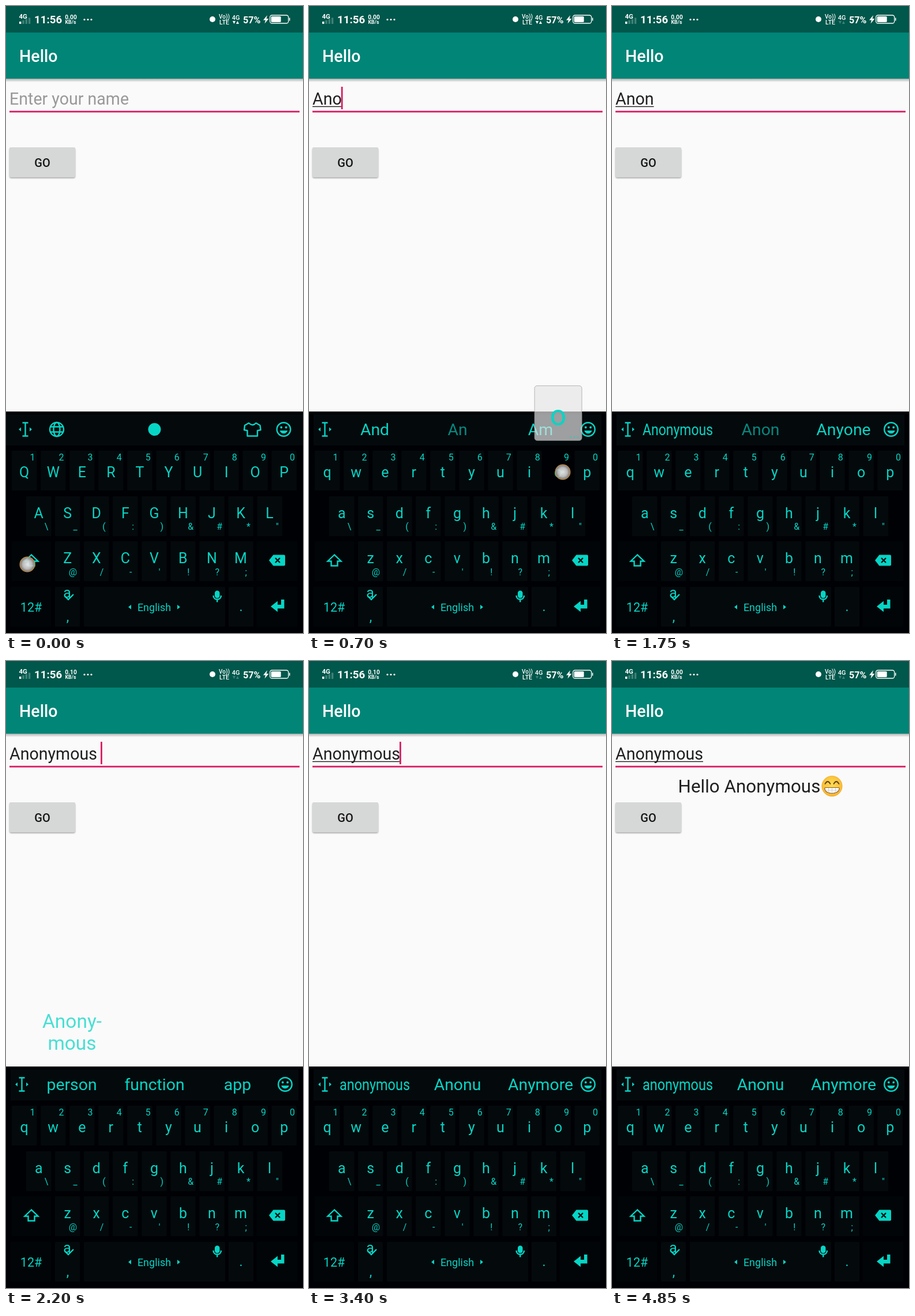
An HTML page for the animation above (4.9 s loop, 515 px wide and 1087 px high).

```html
<!DOCTYPE html>
<html lang="en">
<head>
<meta charset="utf-8">
<title>Hello</title>
<style>
  html, body { margin: 0; width: 100%; height: 100%; overflow: hidden; background: #fafafa; }
  svg { display: block; width: 515px; height: 1087px; }
  text { font-family: Roboto, "Noto Sans", sans-serif; white-space: pre; }
  .ink { fill: #1f1f1f; }
  .key { fill: #04090c; }
  .fn { fill: #020508; }
  .teal { fill: #06d5c5; }
  .line { fill: none; stroke: #06d5c5; stroke-width: 2.4; }
  .mid { text-anchor: middle; }
  .bold { font-weight: 700; fill: #fff; }
</style>
</head>
<body>
<svg id="stage" viewBox="0 0 515 1087"></svg>
<script>
const LOOP = 4900, FIELD = 28.6;
const stage = document.getElementById('stage');
const $ = id => document.getElementById(id);

const rect = (x, y, w, h, attrs = '') => `<rect x="${x}" y="${y}" width="${w}" height="${h}" ${attrs}/>`;
const path = (d, attrs) => `<path d="${d}" ${attrs}/>`;
const escape = s => s.replace(/&/g, '&amp;').replace(/</g, '&lt;');
const text = (s, x, y, size, attrs = 'class="teal mid"') =>
  `<text x="${x}" y="${y}" font-size="${size}" ${attrs}>${escape(s)}</text>`;
const group = (id, body, attrs = '') => `<g id="${id}" ${attrs}>${body}</g>`;

const defs = `<defs>
  <linearGradient id="shade" x2="0" y2="1">
    <stop stop-color="#000" stop-opacity=".3"/><stop offset="1" stop-color="#000" stop-opacity="0"/>
  </linearGradient>
  <radialGradient id="touch">
    <stop stop-color="#eee" stop-opacity=".95"/><stop offset=".6" stop-color="#ccc" stop-opacity=".92"/>
    <stop offset="1" stop-color="#8a8a8a" stop-opacity=".85"/>
  </radialGradient>
  <radialGradient id="face" cy=".4" r=".6">
    <stop stop-color="#ffdd55"/><stop offset="1" stop-color="#f9b52a"/>
  </radialGradient>
  <filter id="soft" x="-10%" y="-10%" width="120%" height="130%"><feGaussianBlur stdDeviation="1.3"/></filter>
</defs>`;

function statusBar() {
  const bars = [0, 1, 2, 3].map(i =>
    rect(23 + i * 5.3, 27 - i * 2.2, 3.4, 4 + i * 2.2, `fill="#fff" opacity="${i ? .25 : 1}"`)).join('');
  const dots = [136, 142, 148].map(x => `<circle cx="${x}" cy="23.5" r="1.6" fill="#fff"/>`).join('');
  const bold = 'class="bold"', midBold = 'class="bold mid"', plain = 'class="mid" fill="#fff" font-weight="500"';
  return rect(0, 0, 515, 46, 'fill="#00574b"') + bars + dots +
    text('4G', 22.5, 22, 11.5, bold) + text('11:56', 49, 30, 18.7, bold) +
    text('0.00', 112.5, 22.5, 10.2, midBold + ' id="rate"') + text('KB/s', 112, 31, 8.8, midBold) +
    '<circle cx="358" cy="23" r="5" fill="#fff"/>' +
    text('Vo))', 378.5, 22, 10, plain) + text('LTE', 378.5, 31.5, 10.5, plain) +
    text('4G', 398.5, 23.5, 11, plain) +
    path('M393 26h5l-2.5 5zM399 31h5l-2.5 -5z', 'id="data" fill="#fff"') +
    text('57%', 411, 29.5, 16.2, bold) +
    path('M453 16l-7 8.5h4l-1.5 6 7-8.5h-4z', 'fill="#fff"') +
    rect(457.7, 16, 32, 14, 'rx="3.5" fill="none" stroke="#fff" stroke-width="1.3"') +
    rect(459.7, 18, 17, 10, 'rx="1.5" fill="#fff"') + rect(491, 20.5, 1.5, 5, 'fill="#fff"');
}

function grin() {
  const brown = 'fill="none" stroke="#5f4226" stroke-width="1.8" stroke-linecap="round"';
  return `<g transform="translate(381.5 217)">
    <circle r="17.6" fill="url(#face)" stroke="#eba52c" stroke-width=".8"/>
    ${path('M-12 -4q4.5 -8 9 0M3 -4q4.5 -8 9 0', brown)}
    ${path('M-11 2.5h22q2 0 1.6 2.4C11 15-11 15-12.6 4.9Q-13 2.500-11 2.500z', 'fill="#fff" stroke="#8a6237" stroke-width="1.2"')}
    ${path('M-12 7h24M-6 3v8.500M0 3v9M6 3v8.500', 'fill="none" stroke="#c9c3bd" stroke-width=".8"')}</g>`;
}

function appPage() {
  return rect(0, 0, 515, 1087, 'fill="#fafafa"') + rect(0, 126, 515, 6, 'fill="url(#shade)"') +
    rect(0, 46, 515, 80, 'fill="#008577"') + statusBar() +
    text('Hello', 23, 97, FIELD, 'fill="#fff" font-weight="500"') +
    text('Enter your name', 6, 171, FIELD, 'id="hint" fill="#999"') +
    text('', 6, 171, FIELD, 'id="name" class="ink"') +
    rect(6, 173.7, 0, 1.4, 'id="compose" class="ink"') +
    rect(6, 181.700, 503, 2.8, 'fill="#d81b60"') +
    rect(0, 140, 2.8, 39, 'id="caret" fill="#d81b60"') +
    rect(6, 247, 114, 51.5, 'rx="3" fill="#000" opacity=".35" filter="url(#soft)"') +
    rect(5.7, 245, 114.5, 52, 'id="button" rx="2.5"') +
    text('GO', 63, 279, 20, 'class="mid" fill="#151515" font-weight="500"') +
    group('greeting', text('Hello Anonymous', 114.500, 228, 31.4, 'class="ink"') + grin());
}

const beam = x => `<g transform="translate(${x} 734)">` +
  path('M-5 -11.500h10M0 -11.500v23M-5 11.500h10', 'class="line"') +
  path('M-7.500 -3.500v7l-4 -3.500zM7.500 -3.500v7l4 -3.500z', 'class="teal"') + '</g>';
const smiley = x => `<g transform="translate(${x} 734)"><circle r="11.800" class="line"/>` +
  '<circle cx="-4.200" cy="-3.500" r="1.900" class="teal"/><circle cx="4.200" cy="-3.500" r="1.900" class="teal"/>' +
  path('M-6.800 2h13.600c-2 7-11.600 7-13.600 0z', 'class="teal"') + '</g>';
const eraser = (x, y, scale, cross) => `<g transform="translate(${x} ${y}) scale(${scale})">` +
  path('M-14 0l7.500 -9.500h18.500q2 0 2 2v15q0 2 -2 2h-18.500z', 'class="teal"') +
  path('M-3 -4l8 8M5 -4l-8 8', `stroke="${cross}" stroke-width="2.200"`) + '</g>';

function toolbar() {
  const globe = '<g transform="translate(88 734)" class="line"><circle r="12"/><ellipse rx="5.500" ry="12"/>' +
    path('M-11 -4.500h22M-11 4.500h22', '') + '</g>';
  const shirt = path('M421 723l-7 4-1 8 5.500 1v9.500h17.500v-9.500l5.500 -1-1-8-7-4q-6 6.500-12.500 0z',
    'class="line" stroke-linejoin="round"');
  return rect(0, 708, 515, 54, 'class="key"') + beam(33.500) + globe +
    '<circle cx="257.500" cy="734" r="11" class="teal"/>' + shirt + smiley(481.500);
}

const ROWS = [
  { keys: 'QWERTYUIOP', hints: '1234567890', x: 10, y: 771, base: 817, hintX: 36, hintY: 788 },
  { keys: 'ASDFGHJKL', hints: '\\_(:)&#*"', x: 35, y: 850, base: 888, hintX: 35, hintY: 908 },
  { keys: 'ZXCVBNM', hints: '@/-\'!?;', x: 85, y: 928, base: 966, hintX: 31, hintY: 987 }
];
const PITCH = 50.05;

function keyboard() {
  const letters = ROWS.map(r => [...r.keys].map((k, i) => {
    const x = r.x + i * PITCH;
    return rect(x, r.y, 43.500, 69, `class="key" rx="1.500" id="pad${k}"`) +
      text(k, x + 21.700, r.base, 25, 'class="teal mid letter"') +
      text(r.hints[i], x + r.hintX, r.hintY, 16);
  }).join('')).join('');
  const fn = [[10, 928, 68], [435, 928, 70], [8, 1007, 70], [435, 1007, 70]]
    .map(([x, y, w]) => rect(x, y, w, 69, 'class="fn" rx="1.500"')).join('');
  const bottom = [[85, 43], [135, 245], [386, 43]]
    .map(([x, w]) => rect(x, 1007, w, 69, 'class="key" rx="1.500"')).join('');
  const slots = [114, 257.500, 401.500].map((x, i) =>
    `<g transform="translate(${x} 744)">${text('', 0, 0, 28.4, `class="teal mid" id="word${i}"`)}</g>`).join('');
  return rect(0, 703, 515, 384, 'fill="#000104"') + group('tools', toolbar()) +
    group('strip', rect(8, 708, 499, 54, 'class="key"') + beam(27.500) + smiley(484) + slots) +
    fn + bottom + letters +
    path('M44 951.500l-11.500 11h6v8h11v-8h6z', 'class="line" stroke-width="2.200"') +
    eraser(470, 961, 1, '#020508') +
    text('12#', 43.500, 1049.500, 21.500) +
    text('a', 106, 1026, 25) + path('M103 1024l5 5 9 -9', 'class="line" stroke-width="2"') +
    text(',', 107, 1067, 23) + text('.', 407.500, 1049, 23) +
    text('English', 257, 1048.500, 18) +
    path('M217 1038v8l-5 -4zM297 1038v8l5 -4z', 'class="teal"') +
    rect(362, 1013.500, 8.500, 13, 'rx="4.200" class="teal"') +
    path('M359.500 1022c0 9 13.500 9 13.500 0M366.200 1028.500v5', 'class="line" stroke-width="1.800"') +
    path('M477 1029h5.500v15.500h-11.500v6l-12 -9.500 12 -9.500v6.500h6z', 'class="teal"');
}

function overlays() {
  const fly = text('Anony-', 114.500, 635.500, 33.500) + text('mous', 114.500, 673.500, 33.500);
  const bubble = rect(-41, 0, 82, 95, 'rx="4.500" fill="#e6e6e6" fill-opacity=".68" stroke="#999" stroke-opacity=".7"') +
    text('', 0, 69, 50, 'class="teal mid" id="bubbleKey"') +
    group('bubbleDots', [63, 69, 75].map(x => `<circle cx="${x - 41}" cy="89" r="1" class="teal"/>`).join('')) +
    group('bubbleErase', eraser(0, 47.500, 1.170, '#a0a0a0'));
  return group('fly', fly) + group('bubble', bubble) +
    '<circle id="dot" r="12.800" fill="url(#touch)" stroke="#b88a45" stroke-width="1.500"/>';
}

stage.innerHTML = defs + appPage() + keyboard() + overlays();

const TYPED = [ // start, value, composing, caret phase start
  [0, '', false, -600], [300, 'A', true, 300], [500, 'An', true, 500], [650, 'Ano', true, 650],
  [900, 'Anon', true, 900], [2000, 'Anonymous ', false, 2000],
  [2800, 'Anonymous', false, 2800], [3000, 'Anonymous', true, 3000]
];
const WORDS = [ // start, suggestions, middle dimmed
  [0, null], [500, ['And', 'An', 'Am'], true], [950, ['Anonymous', 'Anon', 'Anyone'], true],
  [2050, ['person', 'function', 'app']], [3000, ['anonymous', 'Anonu', 'Anymore']]
];
const TAPS = [ // start, end, x, y, key
  [0, 100, 37, 968], [250, 350, 57, 886, 'A'], [450, 550, 357, 966, 'N'], [650, 750, 440, 808, 'O'],
  [900, 1000, 360, 964, 'N'], [1900, 2000, 112, 738], [2800, 2900, 491, 978, 'erase'], [3450, 3600, 66, 274, 'go']
];

const pen = document.createElement('canvas').getContext('2d');
const widthOf = (s, size) => {
  pen.font = `${size}px Roboto, "Noto Sans", sans-serif`;
  return pen.measureText(s).width;
};
const latest = (table, t) => table.filter(row => row[0] <= t).pop();
const show = (id, on) => $(id).setAttribute('visibility', on ? 'visible' : 'hidden');
const letters = [...document.querySelectorAll('.letter')].map(el => [el, el.textContent]);

function drawField(t) {
  const [, value, composing, phase] = latest(TYPED, t);
  const end = widthOf(value, FIELD);
  $('name').textContent = value;
  show('hint', !value);
  show('compose', composing);
  $('compose').setAttribute('width', end);
  $('caret').setAttribute('x', 5 + end);
  show('caret', (t - phase) % 1000 < 500);
  show('greeting', t >= 3550);
}

function drawWords(t) {
  const [, words, dim] = latest(WORDS, t);
  show('tools', !words);
  show('strip', words);
  (words || []).forEach((word, i) => {
    const el = $('word' + i), squeeze = Math.min(1, 122 / widthOf(word, 28.4));
    el.textContent = word;
    el.setAttribute('transform', `scale(${squeeze} 1)`);
    el.setAttribute('opacity', dim && i === 1 ? .62 : 1);
  });
}

function drawTap(t) {
  const tap = TAPS.find(([from, to]) => t >= from && t < to);
  const key = tap && tap[4];
  const row = ROWS.find(r => key && r.keys.includes(key));
  show('dot', tap);
  if (tap) $('dot').setAttribute('transform', `translate(${tap[2]} ${tap[3]})`);
  $('button').setAttribute('fill', key === 'go' ? '#bdbebe' : '#d6d7d7');
  document.querySelectorAll('[id^=pad]').forEach(pad =>
    pad.setAttribute('opacity', row && pad.id === 'pad' + key ? 0 : 1));
  show('bubble', row || key === 'erase');
  show('bubbleErase', key === 'erase');
  show('bubbleDots', row);
  $('bubbleKey').textContent = row ? (t < 400 ? key : key.toLowerCase()) : '';
  const x = row ? row.x + row.keys.indexOf(key) * PITCH + 21.700 : 469.500;
  $('bubble').setAttribute('transform', `translate(${x} ${(row ? row.y : 928.500) - 112.700})`);
}

function draw(t) {
  drawField(t);
  drawWords(t);
  drawTap(t);
  const upper = t < 400;
  letters.forEach(([el, k]) => { el.textContent = upper ? k : k.toLowerCase(); });
  $('rate').textContent = t >= 1900 && t < 4500 ? '0.10' : '0.00';
  $('data').setAttribute('opacity', t < 1000 ? 1 : .25);
  const p = (t - 2000) / 400;
  show('fly', p >= 0 && p < 1);
  $('fly').setAttribute('transform', `translate(0 ${(.5 - p) * 150})`);
  $('fly').setAttribute('opacity', Math.max(0, Math.min(1, (1 - p) * 1.450)));
}

const start = performance.now();
function tick() {
  const t = (performance.now() - start) % LOOP;
  draw(Math.floor(t / 50) * 50);
  requestAnimationFrame(tick);
}
tick();
</script>
</body>
</html>
```
